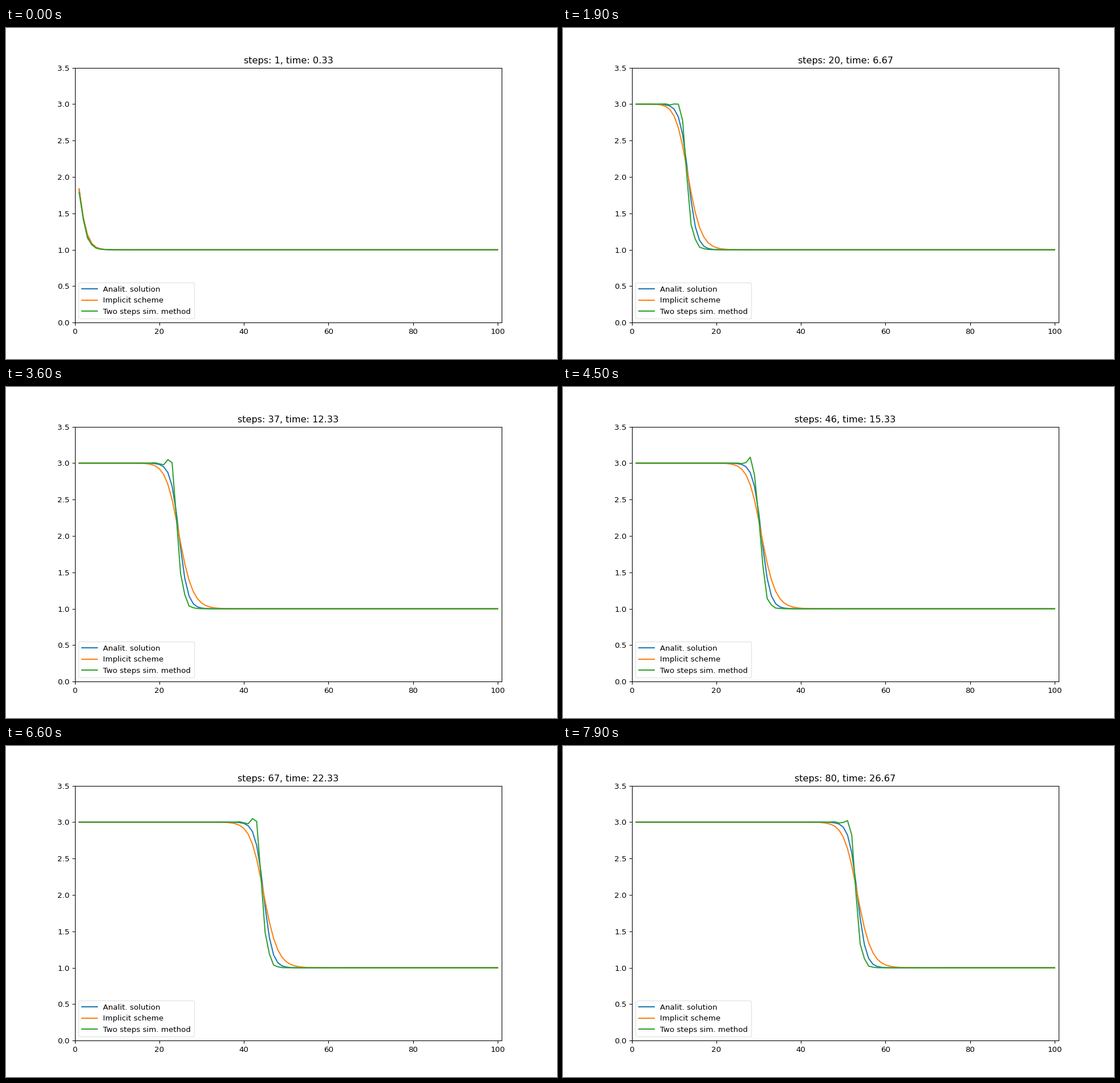
A matplotlib script for the animation above (8 s loop, 966 px wide and 580 px high).

```python
import numpy as np
import matplotlib.pyplot as plt
from matplotlib.animation import FuncAnimation

# Viscous Burgers equation u_t + u u_x = u_xx with a shock moving at speed 2
STEPS = 80
DT = 1 / 3
C = DT / 2      # convection factor, dx = 1
D = DT          # diffusion factor
x = np.arange(102)


def exact(t):
    return 2 - np.tanh((x - 2 * t) / 2)


def implicit_step(u, t):
    """Backward Euler with the flux linearised around the old state."""
    new = exact(t)
    low, up = D + C * u[:-2], D - C * u[2:]
    a = (1 + 2 * D) * np.eye(100) - np.diag(low[1:], -1) - np.diag(up[:-1], 1)
    b = u[1:-1] + C / 2 * (u[2:]**2 - u[:-2]**2)
    b[0] += low[0] * new[0]
    b[-1] += up[-1] * new[-1]
    new[1:-1] = np.linalg.solve(a, b)
    return new


def hopscotch_step(u, n):
    """Explicit sweep on one half of the grid, implicit on the other."""
    new = exact(n * DT)
    i = x[1:-1]
    e, m = i[(i + n) % 2 == 0], i[(i + n) % 2 == 1]
    new[e] = (u[e] * (1 - 2 * D - C * (u[e + 1] - u[e - 1]))
              + D * (u[e + 1] + u[e - 1]))
    new[m] = ((u[m] + D * (new[m + 1] + new[m - 1]))
              / (1 + 2 * D + C * (new[m + 1] - new[m - 1])))
    return new


def solve():
    imp = hop = exact(0)
    states = []
    for n in range(1, STEPS + 1):
        imp = implicit_step(imp, n * DT)
        hop = hopscotch_step(hop, n)
        states.append((exact(n * DT), imp, hop))
    return states


states = solve()
fig, ax = plt.subplots(figsize=(10, 6.0042), dpi=96.6)  # 966 x 580 px
ax.set_xlim(0, 101)
ax.set_ylim(0, 3.5)
labels = ("Analit. solution", "Implicit scheme", "Two steps sim. method")
lines = [ax.plot(x[1:-1], u[1:-1], label=s)[0]
         for u, s in zip(states[0], labels)]
ax.legend(loc="lower left", edgecolor="0.87")
title = ax.set_title("")


def update(k):
    for line, u in zip(lines, states[k]):
        line.set_ydata(u[1:-1])
    title.set_text(f"steps: {k + 1}, time: {round((k + 1) * DT, 2)}")
    return [*lines, title]


anim = FuncAnimation(fig, update, frames=STEPS, interval=100,
                     repeat=True, repeat_delay=0, blit=False)
plt.show()
```
